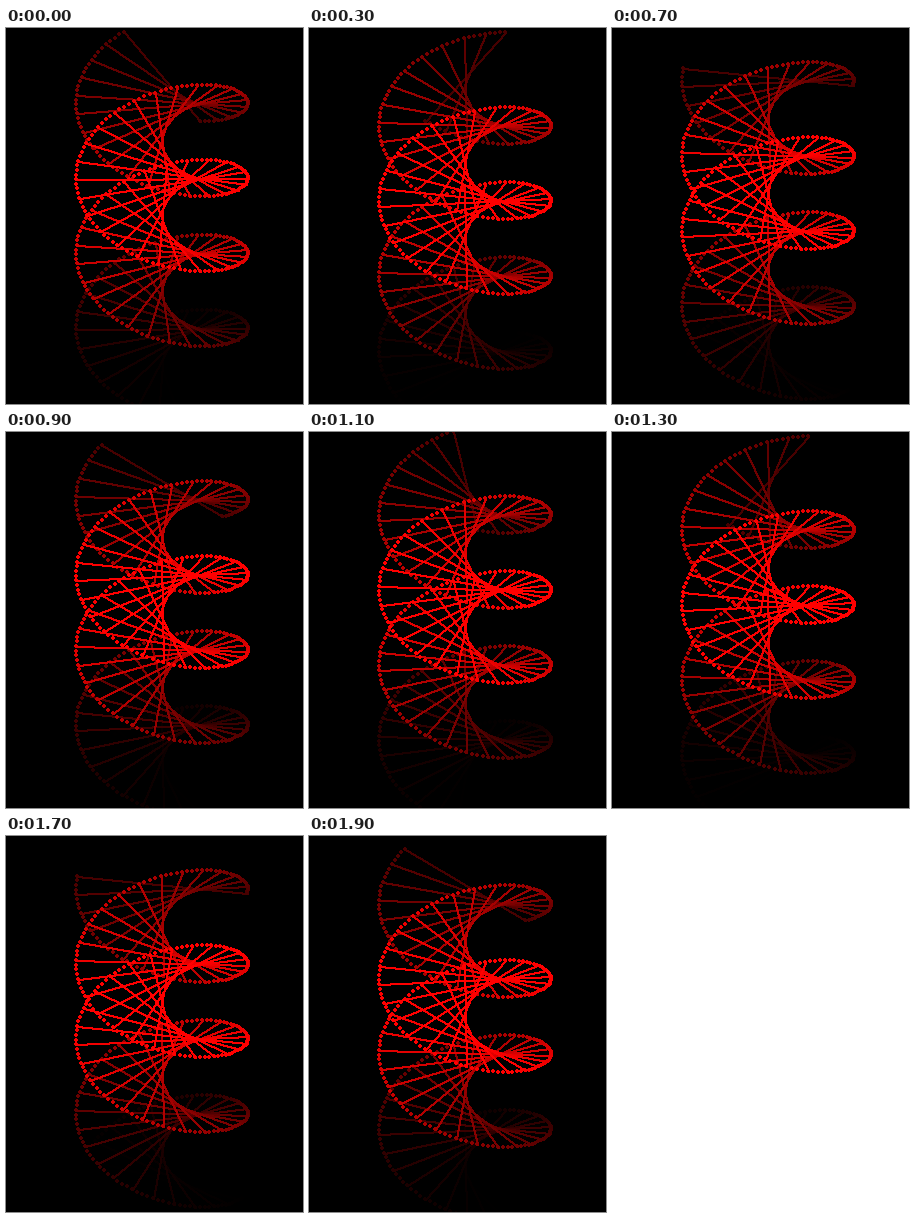
An HTML page with a canvas that plays this animation: 297 px wide and 376 px high, repeating every 2000 ms.

```html
<!DOCTYPE html>
<html lang="en">
<head>
<meta charset="utf-8">
<title>Turning double helix</title>
<style>
  html, body { margin: 0; width: 100%; height: 100%; overflow: hidden; background: #000; }
  canvas { display: block; }
</style>
</head>
<body>
<canvas id="stage" width="297" height="376"></canvas>
<script>
const ctx = document.getElementById('stage').getContext('2d');
const AXIS_X = 156;
const RADIUS_X = 86;
const RADIUS_Y = 50;
const TOP = 48.4;
const HALF_TURN = 75;      // axis height of half a turn
const DOTS = 200;
const DOT_GAP = 1.5;
const DOTS_PER_RUNG = 4;
const STEP_MS = 100;
const STEPS = 10;          // steps in half a turn

// Brightest near the middle, fading towards both ends.
function shade(height) {
  const u = (height - 168) / 182;
  if (Math.abs(u) >= 1) return 0;
  return Math.round(255 * Math.min(1, 1.06 * Math.cos(u * Math.PI / 2) ** 2));
}

// Hard-edged line drawn with a pen of two by two pixels.
function pixelLine(x0, y0, x1, y1) {
  const count = Math.max(Math.abs(x1 - x0), Math.abs(y1 - y0), 1);
  for (let i = 0; i <= count; i++) {
    const x = Math.round(x0 + (x1 - x0) * i / count);
    const y = Math.round(y0 + (y1 - y0) * i / count);
    ctx.fillRect(x, y, 2, 2);
  }
}

function dot(x, y) {
  ctx.fillRect(x - 2, y - 1, 4, 2);
  ctx.fillRect(x - 1, y - 2, 2, 4);
}

function draw(step) {
  ctx.globalCompositeOperation = 'source-over';
  ctx.fillStyle = '#000';
  ctx.fillRect(0, 0, 297, 376);
  ctx.globalCompositeOperation = 'lighten';

  const shift = step * HALF_TURN / STEPS;
  for (let i = 0; i <= DOTS; i++) {
    const height = TOP + i * DOT_GAP;
    const red = shade(height);
    if (!red) continue;
    ctx.fillStyle = `rgb(${red},0,0)`;

    // The strands lie opposite each other around the axis.
    const angle = Math.PI * (height - shift) / HALF_TURN;
    const dx = RADIUS_X * Math.cos(angle);
    const dy = RADIUS_Y * Math.sin(angle);
    const x0 = Math.round(AXIS_X - dx), y0 = Math.round(height + dy);
    const x1 = Math.round(AXIS_X + dx), y1 = Math.round(height - dy);
    if (i % DOTS_PER_RUNG === 0) pixelLine(x0, y0, x1, y1);
    dot(x0, y0);
    dot(x1, y1);
  }
}

const start = performance.now();
function tick() {
  const time = Math.max(0, performance.now() - start);
  draw(Math.floor(time / STEP_MS) % STEPS);
  requestAnimationFrame(tick);
}
tick();
</script>
</body>
</html>
```
